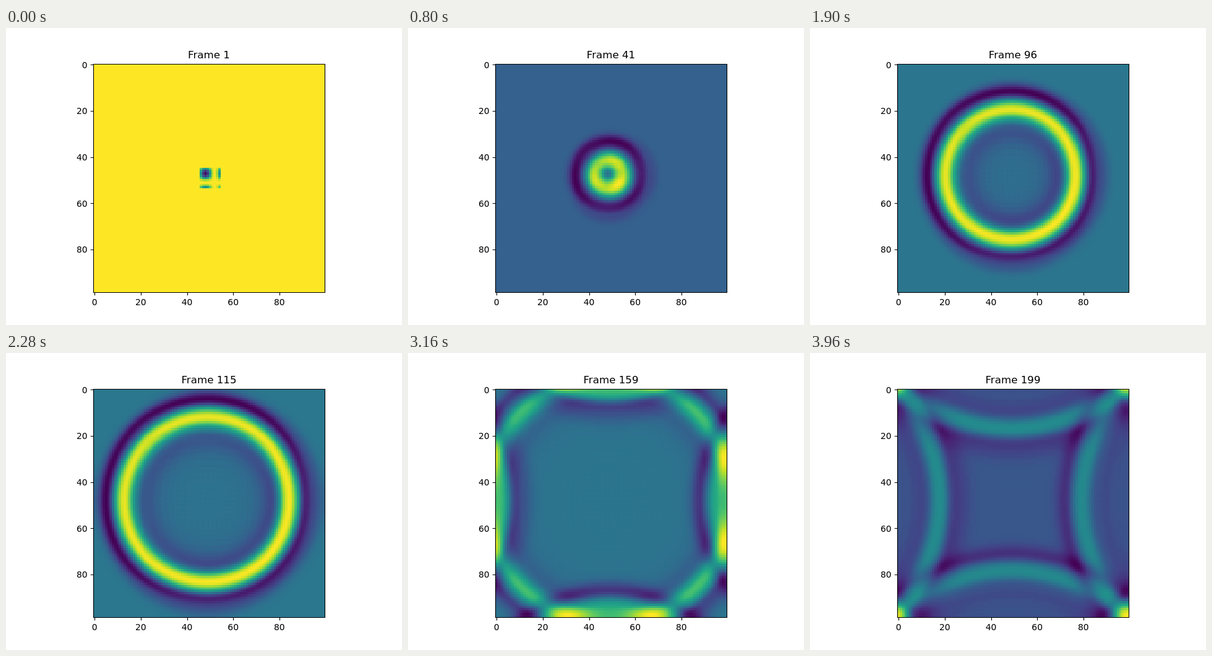
Animation of 640x480 px, one loop 3980 ms. Source, as an HTML page with a canvas:

```html
<!DOCTYPE html>
<html lang="en">
<head>
<meta charset="utf-8">
<title>Wave field</title>
<style>
html, body { margin: 0; width: 100%; height: 100%; overflow: hidden; background: #fff; }
canvas, svg { position: absolute; left: 0; top: 0; width: 640px; height: 480px; }
text { font: 13.889px "DejaVu Sans", sans-serif; fill: #000; }
#title { font-size: 16.667px; text-anchor: middle; }
.x { text-anchor: middle; }
.y { text-anchor: end; }
path { fill: none; stroke: #000; stroke-width: 1.11px; }
</style>
</head>
<body>
<canvas id="stage" width="640" height="480"></canvas>
<svg id="axes" viewBox="0 0 640 480"><text id="title" x="328" y="49">Frame 1</text></svg>
<script>
const COLS = 100, ROWS = 99, FRAMES = 199, STEP = 20;
const LEFT = 141.333, TOP = 57.6, CELL = 369.6 / ROWS;
const HALF = 50, SIZE = HALF + 1, COURANT2 = 0.16;

// The field is symmetric about its centre, so one quadrant is enough.
function fold(k) {
  const a = Math.abs(k - HALF);
  return a > HALF ? 2 * HALF - a : a;
}

function pulse(n) {
  const t = n - 20;
  return n < 1 ? 0 : t * Math.exp(-t * t / 200);
}

function simulate() {
  const states = [];
  let prev = new Float64Array(SIZE * SIZE);
  let now = new Float64Array(SIZE * SIZE);
  for (let n = 1; n <= FRAMES; n++) {
    const next = new Float64Array(SIZE * SIZE);
    for (let a = 0; a < SIZE; a++) {
      const up = (a ? a - 1 : 1) * SIZE;
      const down = (a < HALF ? a + 1 : HALF - 1) * SIZE;
      for (let b = 0; b < SIZE; b++) {
        const i = a * SIZE + b;
        const west = a * SIZE + (b ? b - 1 : 1);
        const east = a * SIZE + (b < HALF ? b + 1 : HALF - 1);
        const lap = now[up + b] + now[down + b] + now[west] + now[east] - 4 * now[i];
        next[i] = 2 * now[i] - prev[i] + COURANT2 * lap;
      }
    }
    next[0] += pulse(n) - pulse(n - 1);
    states.push(next);
    prev = now;
    now = next;
  }
  return states;
}

// Lopsided 9 x 9 smoothing window, applied along each axis in turn.
const kernel = Array.from({ length: 9 }, (_, i) => (1 + Math.sin((i - 4) * Math.PI / 4)) / 2);
const blur = (get, k) => kernel.reduce((sum, w, i) => sum + w * get(fold(k + i - 4)), 0);

function fieldOf(u) {
  const rows = new Float64Array(SIZE * COLS);
  const out = new Float64Array(ROWS * COLS);
  for (let a = 0; a < SIZE; a++)
    for (let c = 0; c < COLS; c++)
      rows[a * COLS + c] = blur(b => u[a * SIZE + b], c);
  for (let r = 0; r < ROWS; r++)
    for (let c = 0; c < COLS; c++)
      out[r * COLS + c] = blur(a => rows[a * COLS + c], r + 1);
  return out;
}

const stops = "440154 482475 414487 355f8d 2a788e 21918c 22a884 44bf70 7ad151 bddf26 fde725"
  .split(" ").map(h => [0, 2, 4].map(i => parseInt(h.substr(i, 2), 16)));
const palette = Array.from({ length: 256 }, (_, i) => {
  const p = i / 25.5, s = Math.min(9, Math.floor(p));
  const [r, g, b] = stops[s].map((v, j) => Math.round(v + (stops[s + 1][j] - v) * (p - s)));
  return (255 << 24 | b << 16 | g << 8 | r) >>> 0;
});

const ctx = document.getElementById("stage").getContext("2d");
const W = 374, H = 369, X0 = 141, Y0 = 58;
const image = ctx.createImageData(W, H);
const pixels = new Uint32Array(image.data.buffer);
const cellAt = (p, start, count) =>
  Math.max(0, Math.min(count - 1, Math.floor((p + 0.5 - start) / CELL)));
const colAt = Array.from({ length: W }, (_, x) => cellAt(x + X0, LEFT, COLS));
const rowAt = Array.from({ length: H }, (_, y) => cellAt(y + Y0, TOP, ROWS));
const title = document.getElementById("title");

function draw(index) {
  const field = fieldOf(states[index]);
  let lo = Infinity, hi = -Infinity;
  for (const v of field) {
    if (v < lo) lo = v;
    if (v > hi) hi = v;
  }
  const scale = 256 / (hi - lo || 1);
  const colours = Array.from(field, v => palette[Math.min(255, Math.floor((v - lo) * scale))]);
  for (let y = 0; y < H; y++)
    for (let x = 0; x < W; x++)
      pixels[y * W + x] = colours[rowAt[y] * COLS + colAt[x]];
  ctx.putImageData(image, X0, Y0);
  title.textContent = "Frame " + (index + 1);
}

function buildAxes() {
  const snap = v => Math.round(v) + 0.5;
  let d = "M141.5 58.5H515.5V427.5H141.5Z", labels = "";
  for (let v = 0; v <= 80; v += 20) {
    const x = LEFT + (v + 0.5) * CELL, y = TOP + (v + 0.5) * CELL;
    d += `M${snap(x)} 427.5v4.86M141.5 ${snap(y)}h-4.86`;
    labels += `<text class="x" x="${x}" y="448">${v}</text>`;
    labels += `<text class="y" x="131.6" y="${Math.round(y + 5.2)}">${v}</text>`;
  }
  document.getElementById("axes").insertAdjacentHTML("beforeend", `<path d="${d}"/>${labels}`);
}

buildAxes();
const states = simulate();
const start = performance.now();
let shown = 0;
draw(0);

function tick() {
  const index = Math.floor((performance.now() - start) / STEP) % FRAMES;
  if (index !== shown) draw(shown = index);
  requestAnimationFrame(tick);
}
requestAnimationFrame(tick);
</script>
</body>
</html>
```
